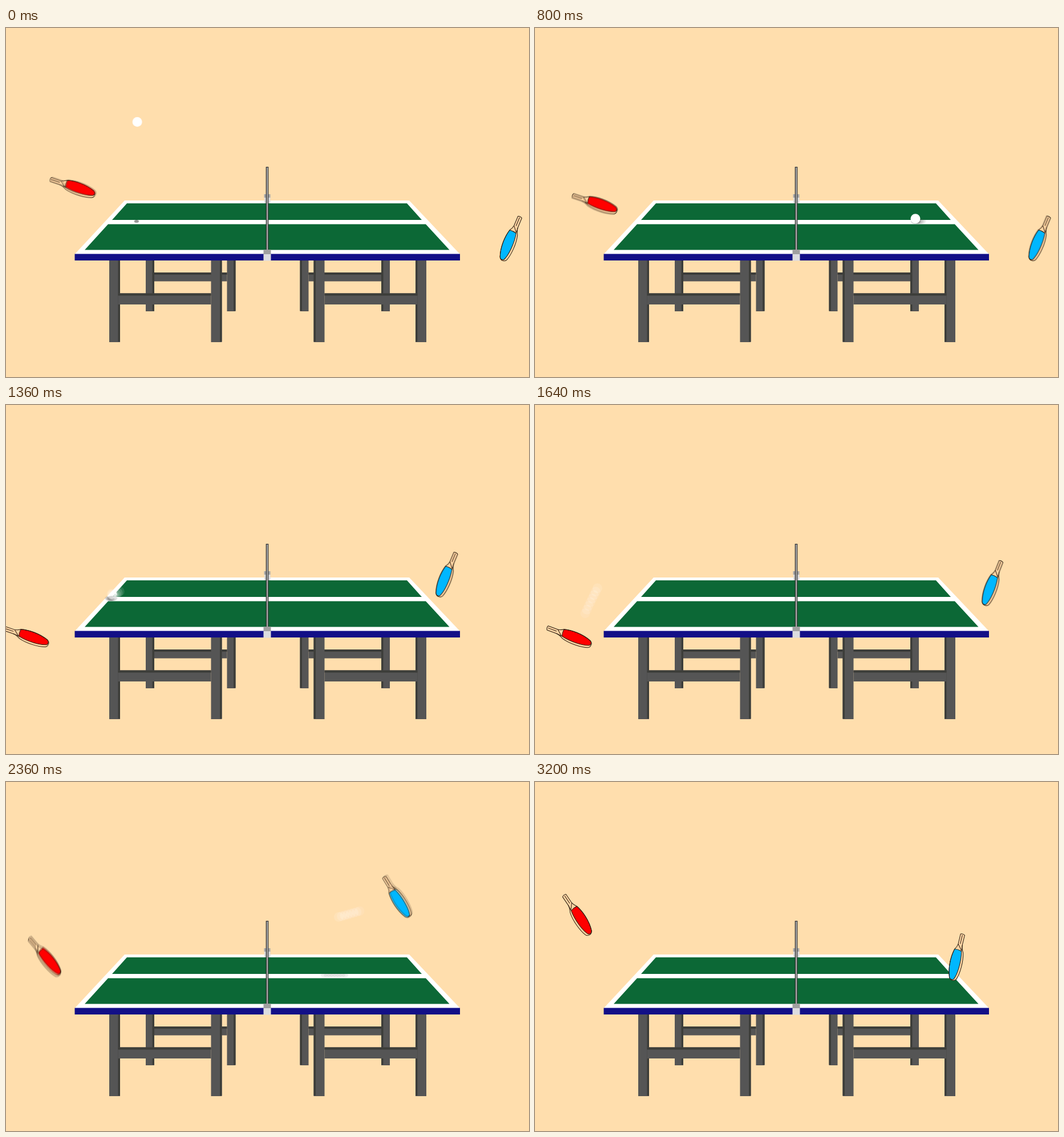
Write an HTML page with a canvas that moves like this. It is 917x611 px and loops after 3.32 s.

```html
<!DOCTYPE html>
<html lang="en">
<head>
<meta charset="utf-8">
<title>Table tennis</title>
<style>
  html, body { margin: 0; width: 100%; height: 100%; overflow: hidden; background: #ffdead; }
  canvas { display: block; width: 917px; height: 611px; }
</style>
</head>
<body>
<canvas id="stage" width="917" height="611"></canvas>
<script>
const W = 917, H = 611, LOOP = 3320, STEP = 40, LAST = 3200;
const SHUTTER = 14, SAMPLES = 8;
const GRAVITY = .0028, TABLE_Y = 334, RADIUS = 8.5, SHADOW_LEAD = 10;

const stage = document.getElementById('stage').getContext('2d');
const table = layer(), scene = layer();

// Strokes of each paddle: time, x, y, angle from handle to tip
const red = {
  color: '#f00', flip: 1,
  keys: [
    [0, 116.5, 279, 18.4],
    [170, 185, 250, 18.4],
    [800, 105, 307, 18.4],
    [1300, 30, 405, 18.4],
    [1625, 60, 405, 20],
    [1960, 61, 410, 28.7],
    [2230, 63.5, 352, 45.5],
    [2565, 73.5, 233, 56]
  ]
};
const blue = {
  color: '#00b7ff', flip: -1,
  keys: [
    [800, 886, 369, 112.7],
    [1360, 773, 297, 112.7],
    [1930, 834, 328, 110],
    [2080, 790, 110, 100],
    [2360, 685, 201, 58],
    [2990, 741, 307, 103.5]
  ]
};

// The ball flies in parabolas from contact to contact
const rally = [
  { t: 0, x: 230.5, y: 164.5, pull: GRAVITY },
  hit(170, red),
  bounce(420, 302, .0033),
  bounce(792, 667),
  bounce(808, 667),
  hit(960, blue),
  bounce(1360, 188),
  hit(1625, red, .0094),
  bounce(1972, 610, .0039),
  hit(2328, blue, 0),
  bounce(2500, 235),
  hit(2565, red),
  bounce(2890, 669),
  { t: LAST, x: 743, y: -10 }
];

const wood = new Path2D('M-41,-4.5 L-23,-4.5 Q-18,-5 -13,-8.5 C0,-12 20,-12.5 37,-6 Q42,-3 41,1 ' +
  'Q41,5.5 37,7 C27,10.5 5,12 -10,7.5 Q-18,3 -23,3 L-40.5,3 Q-43,-1 -41,-4.5Z');
const face = new Path2D('M-13,-8.5 C0,-12 20,-12.5 37,-6 Q42,-3 39,2 C29,7 5,8 -12,4 Q-14,-2 -13,-8.5Z');
const grip = new Path2D('M-40,-1 L-24,-1 M-23,-4.5 L-13,4 M-23,3 L-12,4');

function layer() {
  const c = document.createElement('canvas');
  c.width = W;
  c.height = H;
  return c.getContext('2d');
}

function lerp(a, b, p) { return a + (b - a) * p; }

function clamp(v) { return Math.min(1, Math.max(0, v)); }

function pose({ keys }, t) {
  const i = Math.max(1, keys.findIndex(k => k[0] > t));
  const [a, b] = t >= keys.at(-1)[0] ? keys.slice(-2) : [keys[i - 1], keys[i]];
  const p = clamp((t - a[0]) / (b[0] - a[0]));
  const [x, y, deg] = [1, 2, 3].map(n => lerp(a[n], b[n], p));
  return { x, y, turn: deg * Math.PI / 180 };
}

function bounce(t, x, pull = GRAVITY) {
  return { t, x, y: TABLE_Y, pull };
}

// The ball meets the middle of the rubber at time t
function hit(t, paddle, pull = GRAVITY) {
  const { x, y, turn } = pose(paddle, t);
  const along = 10, out = -18 * paddle.flip;
  return {
    t, pull,
    x: x + along * Math.cos(turn) - out * Math.sin(turn),
    y: y + along * Math.sin(turn) + out * Math.cos(turn)
  };
}

function ballAt(t) {
  const i = Math.max(1, rally.findIndex(c => c.t >= t));
  const a = rally[i - 1], b = rally[i], T = b.t - a.t, p = clamp((t - a.t) / T);
  return { x: lerp(a.x, b.x, p), y: lerp(a.y, b.y, p) - a.pull * T * T * p * (1 - p) };
}

function box(g, color, x0, y0, x1, y1) {
  g.fillStyle = color;
  g.fillRect(x0, y0, x1 - x0, y1 - y0);
}

function poly(g, color, ...pts) {
  g.fillStyle = color;
  g.beginPath();
  for (let i = 0; i < pts.length; i += 2) g.lineTo(pts[i], pts[i + 1]);
  g.fill();
}

function oval(g, color, x, y, rx, ry) {
  g.fillStyle = color;
  g.beginPath();
  g.ellipse(x, y, rx, ry, 0, 0, 7);
  g.fill();
}

function leg(g, x, width, bottom) {
  box(g, '#555', x, 406, x + width, bottom);
  box(g, '#3c3d39', x + width - 3.5, 406, x + width, bottom - 1);
}

function rail(g, x0, x1, y0, y1) {
  box(g, '#555', x0, y0, x1, y1);
  box(g, '#3c3d39', x0, y0, x1, y0 + 4);
}

function trestle(g) {
  for (const x of [245, 387.5]) leg(g, x, 15, 496);
  rail(g, 260, 387.5, 428, 443.5);
  for (const x of [181, 359.5]) leg(g, x, 19, 550);
  rail(g, 196.5, 359.5, 464.5, 484);
}

function drawTable(g) {
  box(g, '#ffdead', 0, 0, W, H);
  trestle(g);
  g.save();
  g.translate(918, 0);
  g.scale(-1, 1);
  trestle(g);
  g.restore();
  poly(g, '#fff', 208, 302, 707, 302, 796, 396, 120.5, 396);
  poly(g, '#0c6836', 212, 307, 703, 307, 729, 336, 186, 336);
  poly(g, '#0c6836', 179, 343.5, 736, 343.5, 777.5, 388.5, 138, 388.5);
  box(g, '#120f87', 120.5, 395.5, 796, 407);
  box(g, '#a9a9a9', 452.5, 291, 463.5, 297);
  box(g, '#dcdcdc', 453, 297, 463.5, 307);
  box(g, '#a0a0a0', 451.5, 388, 464.5, 396);
  box(g, '#dcdce0', 451.5, 396, 464.5, 407.5);
  box(g, '#333', 455.7, 243, 460.3, 388);
  box(g, '#aaa', 457, 244.2, 459.2, 388);
}

function drawBall(g, t) {
  const { x, y } = ballAt(t);
  const sx = ballAt(Math.min(LAST, t + SHADOW_LEAD)).x;
  if (t < 2500 && sx > 176 && sx < 745) {
    const far = clamp((TABLE_Y - y) / 170);
    oval(g, 'rgba(80,80,80,.6)', sx + .5, 338.5, lerp(8.5, 4, far), lerp(4.5, 2.5, far));
  }
  oval(g, '#fff', x, y, RADIUS, RADIUS);
}

function drawPaddle(g, paddle, t) {
  const { x, y, turn } = pose(paddle, t);
  g.save();
  g.translate(x, y);
  g.rotate(turn);
  g.scale(1, paddle.flip);
  g.lineWidth = 1;
  g.lineJoin = 'round';
  g.strokeStyle = '#2a1c10';
  g.fillStyle = '#ffd5a3';
  g.fill(wood);
  g.fillStyle = paddle.color;
  g.fill(face);
  for (const line of [face, wood, grip]) g.stroke(line);
  g.restore();
}

function drawScene(g, t) {
  g.drawImage(table.canvas, 0, 0);
  drawBall(g, t);
  drawPaddle(g, red, t);
  drawPaddle(g, blue, t);
}

// Averages several moments for motion blur
function render(t) {
  for (let i = 0; i < SAMPLES; i++) {
    const shift = (i / (SAMPLES - 1) - .5) * SHUTTER;
    drawScene(scene, Math.min(LAST, Math.max(0, t + shift)));
    stage.globalAlpha = 1 / (i + 1);
    stage.drawImage(scene.canvas, 0, 0);
  }
}

const start = performance.now();
let shown = -1;

function tick() {
  const t = (performance.now() - start) % LOOP;
  const now = Math.min(LAST, Math.floor(t / STEP) * STEP);
  if (now !== shown) render(shown = now);
  requestAnimationFrame(tick);
}

drawTable(table);
tick();
</script>
</body>
</html>
```
